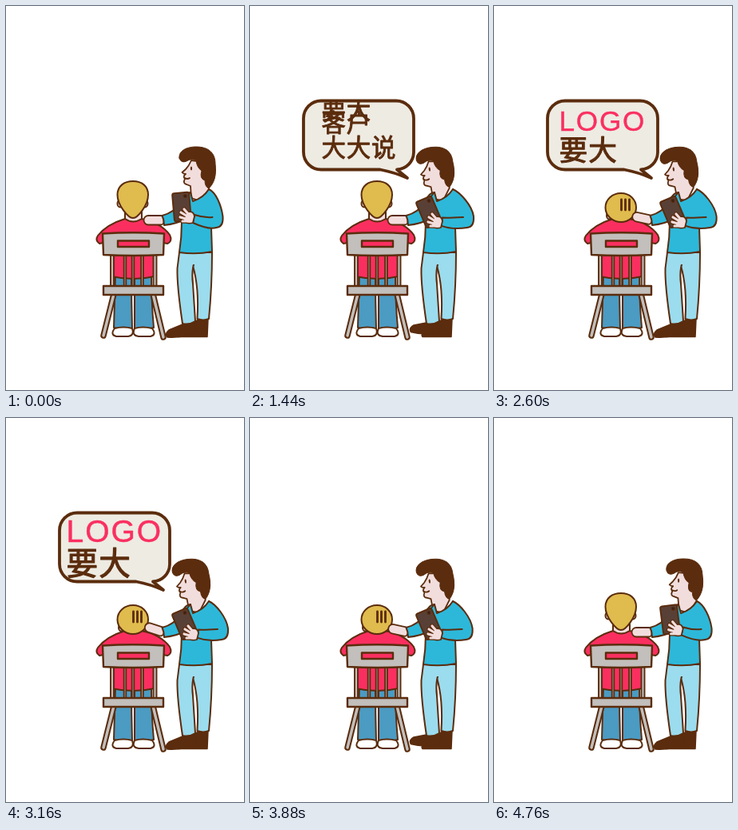
These frames come from a looping animation (298x480 px, 4800 ms). An HTML page with a canvas:

```html
<!DOCTYPE html>
<html lang="zh">
<head>
<meta charset="utf-8">
<style>
html, body { margin: 0; width: 100%; height: 100%; overflow: hidden; background: #fff; }
canvas { display: block; width: 298px; height: 480px; }
</style>
</head>
<body>
<canvas id="stage" width="298" height="480"></canvas>
<script>
const ctx = document.getElementById('stage').getContext('2d');
const LOOP = 4800, STEP = 40;
const BROWN = '#5b2c0d', SKIN = '#f2dddd', PINK = '#fa2f60', GREY = '#c2bfbc',
      CYAN = '#2db8da', SKY = '#9bdcee', DENIM = '#4b9bc3', BLOND = '#e0bb4e',
      PAPER = '#eeebe3', PHONE = '#594036';

const clamp = v => Math.max(0, Math.min(1, v));
const mix = (a, b, k) => a + (b - a) * k;
const span = (t, from, to) => clamp((t - from) / (to - from));
const ease = k => k * k * (3 - 2 * k);

// Piecewise linear value from [time, value] pairs.
function track(t, keys) {
  if (t <= keys[0][0]) return keys[0][1];
  for (let i = 1; i < keys.length; i++) {
    const [t0, v0] = keys[i - 1], [t1, v1] = keys[i];
    if (t <= t1) return mix(v0, v1, span(t, t0, t1));
  }
  return keys[keys.length - 1][1];
}

function shape(d, fill, width = 2, stroke = BROWN) {
  const path = new Path2D(d);
  if (fill) { ctx.fillStyle = fill; ctx.fill(path); }
  if (width) { ctx.lineWidth = width; ctx.strokeStyle = stroke; ctx.stroke(path); }
}

function rounded(x, y, w, h, r, fill, width = 2) {
  ctx.beginPath();
  ctx.roundRect(x, y, w, h, r);
  ctx.fillStyle = fill;
  ctx.fill();
  ctx.lineWidth = width;
  ctx.strokeStyle = BROWN;
  ctx.stroke();
}

function dot(x, y, rx, ry, fill, width = 0) {
  ctx.beginPath();
  ctx.ellipse(x, y, rx, ry, 0, 0, Math.PI * 2);
  ctx.fillStyle = fill;
  ctx.fill();
  if (width) { ctx.lineWidth = width; ctx.strokeStyle = BROWN; ctx.stroke(); }
}

function group(draw) {
  ctx.save();
  draw();
  ctx.restore();
}

function scaleAbout(x, y, k) {
  ctx.translate(x, y);
  ctx.scale(k, k);
  ctx.translate(-x, -y);
}

function rotateAbout(x, y, degrees) {
  ctx.translate(x, y);
  ctx.rotate(degrees * Math.PI / 180);
  ctx.translate(-x, -y);
}

function words(text, x, y, font, color, spacing, weight) {
  ctx.font = font;
  ctx.letterSpacing = spacing + 'px';
  ctx.fillStyle = ctx.strokeStyle = color;
  ctx.lineWidth = weight;
  ctx.fillText(text, x, y);
  ctx.strokeText(text, x, y);
}

const hanzi = (text, x, y) =>
  words(text, x, y, '500 30.5px "Noto Sans CJK SC", "Noto Sans CJK", sans-serif', BROWN, 0.8, 0.9);
const latin = (text, x, y) =>
  words(text, x, y, '30px "Liberation Sans", Arial, sans-serif', PINK, 1.5, 0.35);

function drawWords(t) {
  ctx.beginPath();
  ctx.rect(65, 117, 140, 87);
  ctx.clip();
  if (t >= 440 && t < 1480) {
    const x = 89.5 - 31 * (560 - Math.min(t, 560)) / 40;
    hanzi('客户', x, 156.5);
    hanzi('大大说', x, 188);
  }
  if (t >= 1360) {
    const drop = mix(-79, 0, span(t, 1360, 1560));
    const size = track(t, [[2080, 1], [2240, 1.1], [2800, 1.21], [3160, 1.3], [3360, 1.32]]);
    scaleAbout(136, 161.5, size);
    ctx.translate(0, drop);
    latin('LOGO', 89.5, 156.5);
    hanzi('要大', 89.5, 188);
  }
}

function drawBubble(t) {
  const size = track(t, [[120, 0], [280, 1.165], [400, 1], [3440, 1], [3560, 1.155], [3720, 0]]);
  if (size <= 0) return;
  group(() => {
    scaleAbout(206, 167, size);
    shape('M89 118.5 H183 A22 22 0 0 1 205 140.500 V183 A22 22 0 0 1 184 204.500 L197 215 ' +
          'Q181 208 163 204.500 H89 A22 22 0 0 1 67 182.500 V140.500 A22 22 0 0 1 89 118.500 Z', PAPER, 3.8);
    drawWords(t);
  });
}

function drawSitter(t) {
  const sink = track(t, [[1800, 0], [2200, 1], [4420, 1], [4700, 0]]);
  const gloomy = t >= 2400 && t < 4440;

  shape('M137 334 H157 Q157 370 158 403 Q147 406 135 402 Z', DENIM);
  shape('M161 334 H182 Q182 370 185 402 Q172 406 161 403 Z', DENIM);
  shape('M136 403 Q147 400 158 403 Q161 412 153 413 H138 Q130 411 136 403 Z', '#fff');
  shape('M161 403 Q171 400 183 403 Q189 411 181 413 H166 Q157 412 161 403 Z', '#fff');

  shape('M149 256 V267 Q159 274 170 267 V256 Z', SKIN);
  shape('M149 266 Q159 273 170 266 Q194 271 205 286 Q209 294 202 297 L186 294 V338 ' +
        'Q160 344 132 338 V294 L117 297 Q111 293 115 287 Q126 273 149 266 Z', PINK);

  const earX = mix(15.5, 14, sink), earY = mix(247, 262, sink);
  dot(158.5 - earX, earY, 3.5, 4.5, SKIN, 2);
  dot(158.5 + earX, earY, 3.5, 4.5, SKIN, 2);

  const top = mix(219, 234, sink), bottom = mix(265, 270, sink);
  const side = mix(236, 252, sink), jaw = mix(6, 10.5, sink);
  const left = 139.5, right = 178, mid = 159;
  const high = mix(225, 242, sink), low = mix(249, 262, sink);
  shape(`M${mid} ${top} C${mid + 11} ${top} ${right} ${high} ${right} ${side}
    C${right} ${low} ${mid + jaw} ${bottom} ${mid} ${bottom}
    C${mid - jaw} ${bottom} ${left} ${low} ${left} ${side}
    C${left} ${high} ${mid - 11} ${top} ${mid} ${top} Z`, BLOND);
  if (gloomy) for (const x of [159.5, 164.5, 169.5]) shape(`M${x} 242 V255`, null, 2.8);
}

function drawPost(x, width) {
  ctx.fillStyle = GREY;
  ctx.fillRect(x - width / 2, 311, width, 40);
  shape(`M${x - width / 2} 311 V350 M${x + width / 2} 311 V350`, null, 1.9);
}

function drawChair() {
  for (const x of [133, 186.5]) drawPost(x, 4);
  for (const x of [149, 159, 170.5]) drawPost(x, 2.6);
  for (const d of ['M135 360 L122 412', 'M184 360 L197 414']) {
    shape(d, null, 7.5);
    shape(d, null, 3.4, GREY);
  }
  shape('M122 350 H197 V361 H122 Z', GREY, 2.4);
  shape('M121 284.500 Q159 282 198 284.500 L197 311 Q159 313 122 311 Z', GREY, 2.4);
  shape('M140 293.500 H179 V301 H140 Z', PINK, 2.4);
}

function drawHead(lean) {
  group(() => {
    ctx.translate(-4 * lean, -lean);
    rotateAbout(248, 230, -7 * lean);
    shape('M232 193 Q229 200 225 204 L220.500 208 Q222 210 225 210 Q221 213 224 216 ' +
          'Q221 222 226 223 L231 225 L232 240 L244 244 L254 229 L248 195 Z', SKIN, 1.8);
    shape('M217 190 C216 181 226 176 238 176 C254 176 262 184 262 197 ' +
          'C264 213 260 222 254 228 Q249 226 249 218 Q242 216 245 206 ' +
          'Q239 202 238 193 Q232 190 226 194 Q219 197 217 190 Z', BROWN, 1);
    dot(232, 203, 1.1, 2.6, BROWN);
    shape('M224 215 Q227 217 230 215', null, 1.8);
  });
}

function drawLegs(toe) {
  shape('M240 392 L253 391 L252 413.500 H216 Q212 409 226 406 Z', BROWN, 1.5);
  group(() => {
    rotateAbout(234, 407, 12 * toe);
    shape('M221 398 L237 394 L238 408 Q222 415 202 414 Q198 410 204 405 Z', BROWN, 1.5);
  });
  shape('M234 308 H258 Q258 350 254 391 Q247 394 239.500 391 Q242 352 234 325 Z', SKY);
  shape('M217 308 H241 Q231 325 234 347 L237 394 Q229 399 221 397 Q214 350 214.500 328 Z', SKY);
  ctx.fillStyle = SKY;
  ctx.fillRect(231, 309, 13, 14);
}

function drawPhone(lean) {
  group(() => {
    ctx.translate(mix(220, 224, lean), mix(251, 257.5, lean));
    ctx.rotate(mix(-5, -23, lean) * Math.PI / 180);
    rounded(-10.5, -17.5, 21, 35, 2.5, PHONE, 2);
    dot(5.5, -13, 2, 2, '#3a2218', 1);
  });
}

function drawGrip() {
  const fingers = 'M230 262 L223 254 M229 264 L219 258 M229 267 L218 264 M230 269 L221 269';
  shape(fingers, null, 5.5);
  shape('M226 258 Q235 255 236 263 L234 271 Q226 273 222 268 Z', SKIN, 1.8);
  shape(fingers, null, 3.2, SKIN);
}

function drawStander(t) {
  const lean = ease(span(t, 0, 440)) * (1 - span(t, 4480, 4800));
  const active = t > 240 && t < 4560;
  const beat = (period, phase) => Math.cos((t - phase) / period * Math.PI * 2);
  const pat = active ? clamp(0.7 + beat(320, 280)) : 0;
  const toe = active ? Math.max(0, beat(480, 20)) : 0;
  const elbow = mix(271.5, 280, lean) - 2 * pat * lean;

  drawLegs(toe);
  drawHead(lean);

  // Hand resting on the shoulder, then its sleeve.
  group(() => {
    rotateAbout(197, 269, 18 * pat);
    rounded(172.5, 262, 25, 11.5, [6, 4, 4, 6], SKIN, 1.8);
  });
  shape('M231 233 Q224 233 219 245 Q211 258 195.500 262 Q198 267 198 274 Q214 272 224 267 Z', CYAN);

  shape('M231 233 L234 244 Q247 240 254 229 Q265 238 264 264 L257 277 L258 307 ' +
        'Q238 311 217 308 Q220 289 220 270 Q222 240 231 233 Z', CYAN);

  drawPhone(lean);
  const dx = 5 * lean, dy = 6 * lean;
  const wristX = 235 + dx, wristY = 261 + dy * 0.6;
  const sleeve = `M254 229 C263 233 ${elbow - 2} 249 ${elbow} 263
    Q${elbow + 1} 276 ${elbow - 8} 277 Q254 280 ${wristX - 1} ${wristY + 10} L${wristX + 1} ${wristY}`;
  shape(`${sleeve} Q246 264 257 264 L256 245 Z`, CYAN, 0);
  shape(`${sleeve} Q248 265 ${elbow - 13} 264`, null, 2);
  group(() => {
    ctx.translate(dx, dy);
    drawGrip();
  });
}

function render(now) {
  const t = Math.floor((now % LOOP) / STEP) * STEP;
  ctx.fillStyle = '#fff';
  ctx.fillRect(0, 0, 298, 480);
  ctx.lineJoin = ctx.lineCap = 'round';
  drawBubble(t);
  drawSitter(t);
  drawChair();
  drawStander(t);
}

const start = performance.now();
function frame() {
  render(performance.now() - start);
  requestAnimationFrame(frame);
}
frame();
</script>
</body>
</html>
```
